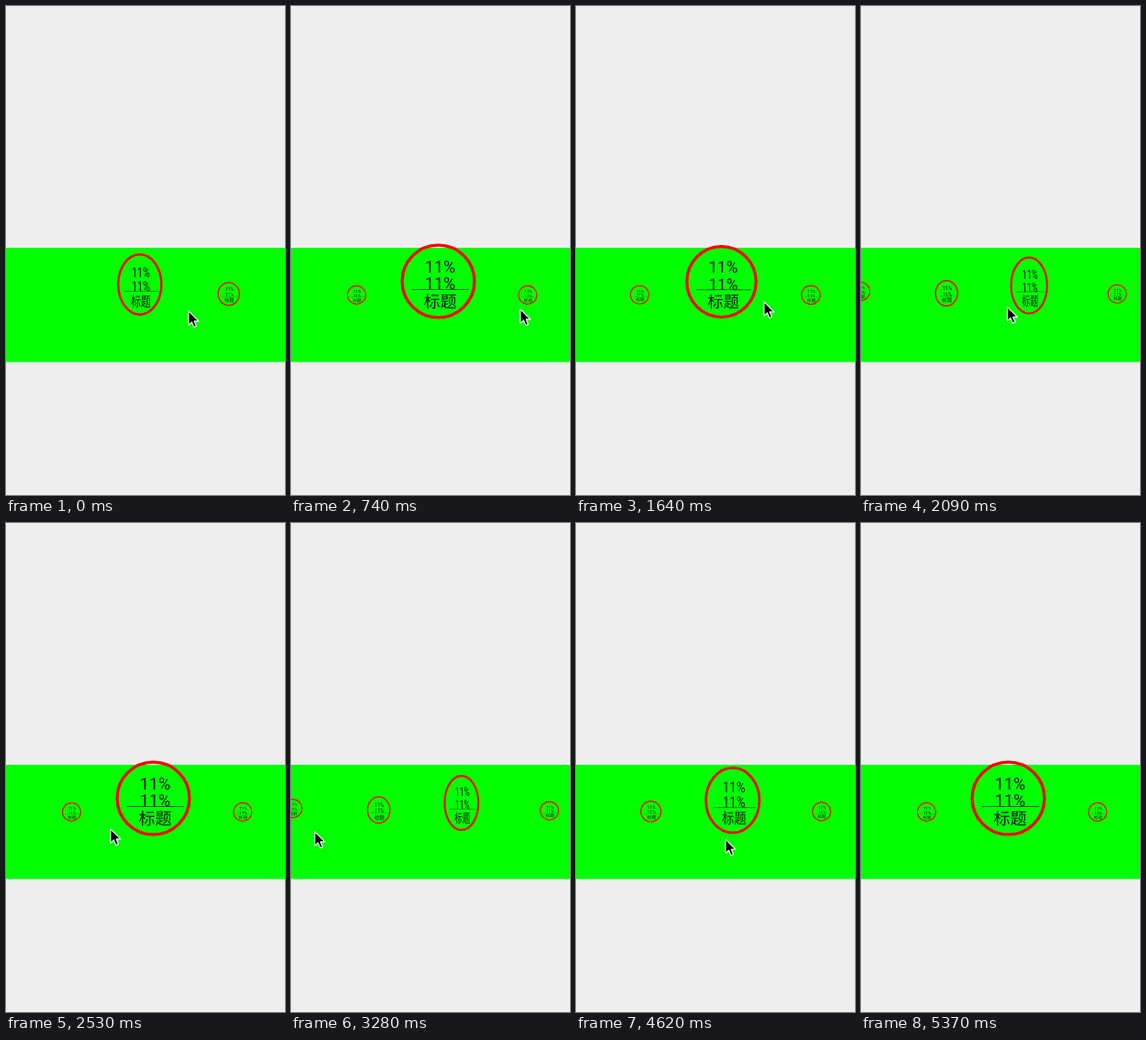
These frames come from a looping animation (304x532 px, 7150 ms). An HTML page:

```html
<!DOCTYPE html>
<html lang="zh">
<head>
<meta charset="utf-8">
<title>Carousel</title>
<style>
  html, body { margin: 0; width: 100%; height: 100%; overflow: hidden; background: #eee; }
  svg { display: block; width: 100%; height: 100%; }
  text {
    font: 18px Roboto, "Noto Sans CJK SC", "Noto Sans CJK", sans-serif;
    text-anchor: middle; text-rendering: geometricPrecision; fill: rgba(0, 0, 0, .9);
  }
  ellipse { fill: none; stroke: #f00; vector-effect: non-scaling-stroke; }
  line { stroke: rgba(0, 0, 0, .6); }
</style>
</head>
<body>
<svg viewBox="0 0 304 532">
  <rect width="304" height="532" fill="#eee"/>
  <rect y="263" width="304" height="124.3" fill="#0f0"/>
  <g id="items"></g>
  <path id="cursor" d="M0 0V15.2L3.5 12L6 17.6L8.6 16.4L6.2 11H11Z"
        fill="#000" stroke="#fff" stroke-width="1.1" stroke-linejoin="round"/>
</svg>
<script>
const LOOP = 7150, LAST = 36, STEP = 5370 / LAST;
const CENTER = 164.7, SPACING = 93.2, COUNT = 9;
const BIG = 39.4, SMALL = 10;

// Times are counted in steps
const swipeStarts = [-1.3, 5, 10.55, 18.65, 27, 31];
const SWIPE = 5;
const poses = [
  { at: 0, x: 198, y: 331 }, { at: 5, x: 249, y: 329 }, { at: 11, x: 204, y: 321 },
  { at: 17, x: 113, y: 332 }, { at: 22, x: 25, y: 335 }, { at: 27, x: 235, y: 349 },
  { at: LAST, x: 60, y: 335 }
];

const group = document.getElementById("items");
const cursor = document.getElementById("cursor");
group.innerHTML = `<g>
  <ellipse rx="${BIG}" ry="${BIG}"/>
  <text x="2" y="-9.8">11%</text>
  <text x="2" y="8.7">11%</text>
  <line x1="-28.5" x2="33.5" y1="8.9" y2="8.9"/>
  <text x="2" y="28.4">标题</text>
</g>`.repeat(COUNT);
const items = [...group.children];

function smooth(x) {
  x = Math.min(1, Math.max(0, x));
  return x * x * (3 - 2 * x);
}

// Width collapses quickly, height slowly, as an item leaves the middle
function shapeAt(offset) {
  const distance = Math.abs(offset);
  const far = Math.min(1, distance / SPACING), near = 1 - far;
  const rx = SMALL + (BIG - SMALL) * Math.exp(-((distance / 17) ** 1.3)) + 3 * Math.sin(Math.PI * far);
  const ry = SMALL + (BIG - SMALL) * near ** 1.4;
  const x = CENTER + offset - 4.2 * near + 10 * far * far * near;
  const y = 314.4 - (ry - SMALL) * 0.505 - 0.055 * Math.max(0, distance - SPACING);
  return { x, y, sx: rx / BIG, sy: ry / BIG };
}

function pointerAt(step) {
  const next = Math.max(1, poses.findIndex(pose => pose.at >= step));
  const a = poses[next - 1], b = poses[next];
  const k = smooth((step - a.at) / (b.at - a.at));
  return { x: a.x + (b.x - a.x) * k, y: a.y + (b.y - a.y) * k };
}

function draw(step) {
  const page = swipeStarts.reduce((sum, start) => sum + smooth((step - start) / SWIPE), 0);
  items.forEach((item, i) => {
    const { x, y, sx, sy } = shapeAt((i - page) * SPACING);
    item.setAttribute("transform", `translate(${x} ${y}) scale(${sx} ${sy})`);
    item.firstElementChild.setAttribute("stroke-width", 0.4 + 2.9 * Math.sqrt(sx * sy));
  });
  const { x, y } = pointerAt(step);
  cursor.setAttribute("transform", `translate(${x + 0.9} ${y + 0.9})`);
  cursor.setAttribute("visibility", step < LAST ? "visible" : "hidden");
}

const start = performance.now();
function tick() {
  const time = (performance.now() - start) % LOOP;
  draw(Math.min(LAST, Math.floor(time / STEP + 0.07)));
  requestAnimationFrame(tick);
}
tick();
</script>
</body>
</html>
```
